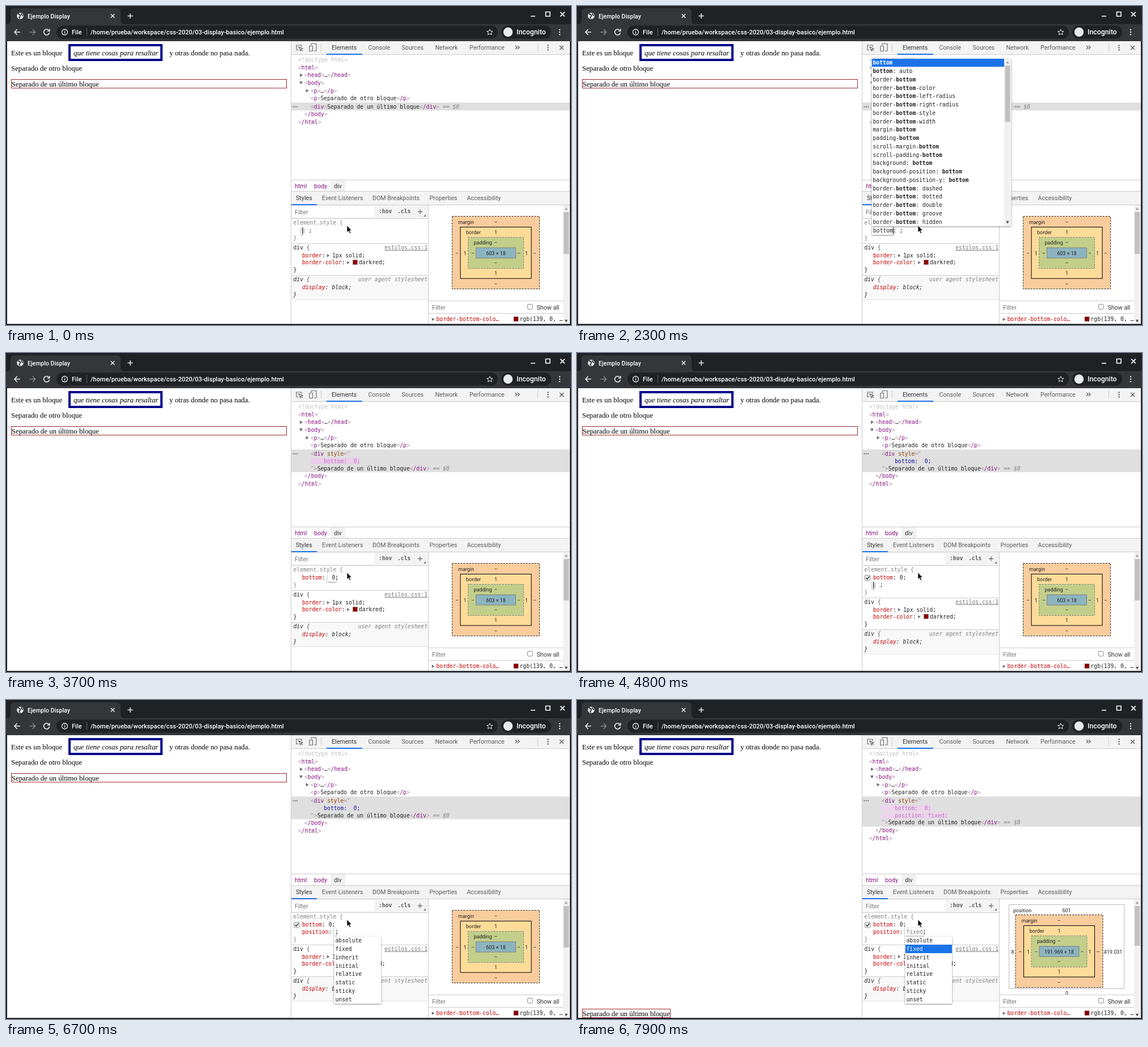
Write an HTML page that moves like this. It is 996x562 px and loops after 8000 ms.

```html
<!DOCTYPE html>
<html lang="es">
<head>
<meta charset="utf-8">
<title>Ejemplo Display</title>
<style>
html, body { margin: 0; width: 100%; height: 100%; overflow: hidden; background: #202124; }
svg { display: block; }
text { white-space: pre; }
.mono { font: 9.69px "DejaVu Sans Mono", monospace; fill: #222; }
.ui { font: 10.68px Roboto, sans-serif; fill: #5a5a5a; }
.bar { font: 500 11.05px Roboto, sans-serif; fill: #fff; }
.box { font: 9px Roboto, sans-serif; fill: #222; }
.page { font: 12.85px "Liberation Serif", serif; fill: #000; }
.it { font-style: italic; }
.b { font-weight: bold; }
.mid { text-anchor: middle; }
.end { text-anchor: end; }
.lift { filter: drop-shadow(0 1px 1.5px rgba(0, 0, 0, .45)); }
.crisp { shape-rendering: crispEdges; }
</style>
</head>
<body>
<svg id="stage" width="996" height="562" viewBox="0 0 996 562"><g id="fixed"></g><g id="live"></g></svg>
<script>
const LOOP = 8000, CW = 5.835, ROW = 14.75;
const RED = '#c80000', BLUE = '#1a73e8', GREY = '#808080', LINE = '#ccc';

// Drawing helpers; text is placed by the vertical centre of its capitals.
const SIZE = { mono: 9.69, ui: 10.68, bar: 11.05, box: 9, page: 12.85 };
const esc = s => s.replace(/&/g, '&amp;').replace(/</g, '&lt;');
const c = (color, s) => `<tspan fill="${color}">${esc(s)}</tspan>`;
const text = (x, cy, s, cls, style = '') =>
  `<text x="${x}" y="${(cy + SIZE[cls.split(' ')[0]] * .355).toFixed(2)}" class="${cls}" style="${style}">${s}</text>`;
const rect = (x, y, w, h, fill, more = '') =>
  `<rect x="${x}" y="${y}" width="${w}" height="${h}" fill="${fill}" ${more}/>`;
const path = (d, stroke, width = 1, fill = 'none') =>
  `<path d="${d}" stroke="${stroke}" stroke-width="${width}" fill="${fill}"/>`;
const circle = (x, y, r, fill, more = '') => `<circle cx="${x}" cy="${y}" r="${r}" fill="${fill}" ${more}/>`;
const TURN = { right: 0, down: 90, up: 270 };
const tri = (x, y, dir, r = 3, fill = '#6e6e6e') =>
  `<path d="M${-r * .8} ${-r}L${r * .9} 0L${-r * .8} ${r}z" fill="${fill}" transform="translate(${x} ${y}) rotate(${TURN[dir]})"/>`;
const cross = (x, y, r, color, w = 1.5) =>
  path(`M${x - r} ${y - r}l${2 * r} ${2 * r}m0 ${-2 * r}l${-2 * r} ${2 * r}`, color, w);
const plus = (x, y, r, color, w = 1.5) => path(`M${x - r} ${y}h${2 * r}M${x} ${y - r}v${2 * r}`, color, w);
const dots = (x, y, gap, color) => [-1, 0, 1].map(k => circle(x, y + k * gap, 1.2, color)).join('');

function chrome() {
  const ink = '#e8eaed';
  return rect(0, 0, 996, 562, '#202124')
    + '<path d="M2 32Q8 32 8 25V11Q8 4 15 4H195Q202 4 202 11V25Q202 32 208 32z" fill="#35363a"/>'
    + rect(0, 32, 996, 30, '#35363a')
    + circle(25, 17.5, 5.8, ink) + path('M21 14q3 0 4 2t-1 3 1 3M27 13q0 3 3 4', '#35363a', 1.8)
    + text(38, 18, 'Ejemplo Display', 'bar', 'font-size:10.5px')
    + cross(188, 17.5, 3.3, ink) + plus(219, 17.5, 4.6, ink)
    + path('M925 18h8M951.5 10.5h7.5v7.5h-7.5z', '#fff', 1.6) + cross(981, 14.5, 3.8, '#fff', 1.7)
    + path('M25 46H15M19.8 41L15 46L19.8 51', ink, 1.6)
    + path('M41.5 46H51.5M47 41L51.5 46L47 51', '#85878a', 1.6)
    + path('M75.5 42.8A5 5 0 1 0 76.5 47M76.8 40.5V44.3H73', ink, 1.6)
    + rect(89, 34.5, 778, 23, '#202124', 'rx="11.5"')
    + circle(103.5, 46, 5, 'none', `stroke="${ink}" stroke-width="1.3"`)
    + path('M103.5 43v1.3M103.5 45.3v3.5', ink, 1.4)
    + text(116, 46, 'File', 'bar') + rect(142, 39, 1, 14, '#5f6368')
    + text(149, 46, '/home/prueba/workspace/css-2020/03-display-basico/ejemplo.html', 'bar')
    + path('M852.8 41l1.5 3.4 3.7.3-2.8 2.4.9 3.7-3.3-2-3.3 2 .9-3.7-2.8-2.4 3.7-.3z', ink)
    + rect(873, 34.5, 88, 23, '#202124', 'rx="11.5"') + circle(885, 46, 8.2, ink)
    + text(900, 46, 'Incognito', 'bar', 'font-size:12.3px') + dots(976, 46, 4.2, ink)
    + rect(2, 62, 992, 498, '#fff');
}

function page() {
  return text(9, 82, 'Este es un bloque', 'page')
    + rect(112, 69, 162, 26, 'none', 'stroke="#00008b" stroke-width="4"')
    + text(119, 82, 'que tiene cosas para resaltar', 'page it')
    + text(288, 82, 'y otras donde no pasa nada.', 'page')
    + text(9, 109, 'Separado de otro bloque', 'page');
}

function devtools() {
  const tabs = (list, y) => list.map(([x, s], i) => text(x, y, s, 'ui', i ? '' : 'fill:#333')).join('');
  return rect(502, 62, 1, 498, LINE)
    + rect(503, 62, 491, 23, '#f3f3f3') + rect(503, 85, 491, 1, LINE) + rect(565, 84, 63, 2, BLUE)
    + path('M515.5 77.5h-3.5v-8.5h9v3M516 72l7 3-3 1-1 3zM520 76l3 3', '#6e6e6e', 1.2)
    + path('M538 69v-2.5h9V79h-4M535 70.5h5.5v9H535z', '#6e6e6e', 1.2) + rect(555, 66, 1, 15, LINE)
    + tabs([[574, 'Elements'], [638.5, 'Console'], [697.5, 'Sources'], [756.5, 'Network'], [817, 'Performance']], 73.5)
    + path('M898 70l3 3-3 3M902 70l3 3-3 3', '#5a5a5a', 1.3) + rect(937, 66, 1, 15, LINE)
    + dots(955.5, 73.5, 4, '#5a5a5a') + cross(979.5, 73.5, 3.5, '#5a5a5a', 1.4)
    + rect(503, 306, 491, 1, LINE) + rect(572, 307, 26, 20, '#f1f1f1')
    + ['html', 'body'].map((s, i) => text(509 + i * 34, 317, s, 'ui', 'fill:#881280')).join('')
    + text(578, 317, 'div', 'ui', 'fill:#333')
    + rect(503, 327, 491, 23, '#f3f3f3') + rect(503, 326, 491, 1, LINE) + rect(503, 350, 491, 1, LINE)
    + rect(503, 349, 45, 2, BLUE)
    + tabs([[511, 'Styles'], [557, 'Event Listeners'], [646, 'DOM Breakpoints'], [746.5, 'Properties'], [812.5, 'Accessibility']], 338.5)
    + rect(503, 351, 241, 23, '#f3f3f3') + rect(505, 353, 144, 19, '#fff') + rect(503, 374, 241, 1, LINE)
    + text(509, 363, 'Filter', 'ui', 'fill:#777')
    + text(657, 362, ':hov', 'mono b', 'fill:#5a5a5a') + text(690, 362, '.cls', 'mono b', 'fill:#5a5a5a')
    + plus(730, 362.5, 4, '#6e6e6e', 1.3) + path('M740 367v4h-4z', 'none', 0, '#6e6e6e')
    + rect(744, 351, 1, 209, LINE);
}

const tag = s => c('#a894a6', '<') + c('#881280', s) + c('#a894a6', '>');

const mix = (a, b, k) => a.map((v, i) => v + (b[i] - v) * k);
const rgb = v => `rgb(${v.map(Math.round)})`;
// cubic-bezier(0, 0, .2, 1)
function ease(x) {
  let lo = 0, hi = 1;
  for (let i = 0; i < 20; i++) {
    const s = (lo + hi) / 2;
    if (.6 * s * s + .4 * s ** 3 < x) lo = s; else hi = s;
  }
  return 3 * lo * lo - 2 * lo ** 3;
}
// A changed attribute flashes violet, rests on pink, then returns to the row colour.
function flash(age) {
  const p = Math.min(age / 1200, 1);
  const violet = [158, 54, 153], pink = [242, 218, 240], pale = [182, 112, 184];
  if (p < .8) {
    const k = ease(p / .8);
    return { back: rgb(mix(violet, pink, k)), ink: rgb(mix([255, 255, 255], pale, k)) };
  }
  const k = ease((p - .8) / .2);
  return { back: rgb(mix(pink, [223, 223, 223], k)), ink: rgb(mix(pale, [26, 26, 166], k)) };
}

const at = (list, t) => list.filter(e => e[0] <= t).pop()[1];

const NAME_1 = [[0, ''], ...[...'bottom'].map((_, i) => [1700 + i * 100, 'bottom'.slice(0, i + 1)])];
const NAME_2 = [[3900, ''], [5100, 'p'], [5300, 'po'], [5400, 'pos'], [5500, 'posit'], [5600, 'position']];
const VALUE_2 = [[6000, ''], [7000, 'absolute'], [7200, 'fixed']];
const CARET = [[0, 1], [600, 0], [1200, 1], [3600, 0], [3900, 1], [4200, 0], [4800, 1], [6700, 0], [7000, 1], [7900, 0]];
const FLASH = [[3100, 3100], [7000, 7000], [7200, 7200]];

function elements(t) {
  const props = t < 3100 ? [] : t < 7000 ? ['bottom:  0;'] : ['bottom:  0;', `position: ${at(VALUE_2, t)};`];
  const extra = props.length ? (props.length + 1) * 12.9 : 0;
  const last = 'Separado de un último bloque' + tag('/div') + `<tspan class="it" fill="${GREY}"> == $0</tspan>`;
  let out = text(515, 95, c('#c0c0c0', '<!doctype html>'), 'mono')
    + text(515, 108.3, tag('html'), 'mono')
    + tri(520.5, 122, 'right') + text(526, 122, tag('head') + '…' + tag('/head'), 'mono')
    + tri(520, 135.5, 'down') + text(526, 135.5, tag('body'), 'mono')
    + tri(531, 149.3, 'right') + text(537, 149.3, tag('p') + '…' + tag('/p'), 'mono')
    + text(537, 163, tag('p') + 'Separado de otro bloque' + tag('/p'), 'mono')
    + rect(503, 170, 491, 14 + extra, '#dfdfdf', 'class="crisp"')
    + [0, 1, 2].map(i => circle(506.5 + i * 3.3, 177.5, 1, '#5a5a5a')).join('');
  if (!props.length) out += text(537, 177.3, tag('div') + last, 'mono');
  else {
    const { back, ink } = flash(t - at(FLASH, t));
    out += text(537, 177.3, c('#a894a6', '<') + c('#881280', 'div') + c('#994500', ' style') + c('#a894a6', '="'), 'mono');
    props.forEach((s, i) => {
      const y = 190.2 + i * 12.9;
      out += rect(537, y - 5.6, (s.length + 4) * CW, 11.2, back) + text(537, y, c(ink, '    ' + s), 'mono');
    });
    out += text(537, 177.3 + extra, c('#a894a6', '">') + last, 'mono');
  }
  return out + text(526, 191 + extra, tag('/body'), 'mono') + text(515, 204.6 + extra, tag('/html'), 'mono');
}

function edit(x, cy, typed, ghost, caret) {
  return rect(x - 2, cy - 7, (typed + ghost).length * CW + 4, 14, '#fff', 'class="lift"')
    + text(x, cy, typed + c(GREY, ghost), 'mono')
    + (caret ? rect(x + typed.length * CW, cy - 6, 1, 12, '#000', 'class="crisp"') : '');
}

const complete = s => s === 'p' ? 'padding' : s[0] === 'p' ? 'position' : s.length > 2 ? 'bottom' : s ? 'border' : '';

function nameEdit(cy, typed, caret) {
  const full = complete(typed);
  return edit(522, cy, typed, full.slice(typed.length), caret)
    + text(522 + full.length * CW, cy, ': ;', 'mono');
}

function styles(t) {
  const caret = at(CARET, t), dy = t < 3900 ? 0 : 12.6;
  const name = (y, s) => text(522, y, c(RED, s) + ':', 'mono');
  let out = text(506.5, 382, c(GREY, 'element.style {'), 'mono');
  if (t < 3000) out += nameEdit(396, at(NAME_1, t), caret);
  else {
    const x = 522 + 8 * CW;
    out += name(396, 'bottom');
    if (t < 3900) {
      const value = t < 3100 ? '' : ' 0';
      out += edit(x, 396, value, '', caret) + text(x + value.length * CW, 396, ';', 'mono');
    } else out += text(x, 396, '0;', 'mono');
  }
  if (t >= 3900 && (t < 5100 || t >= 6000))
    out += rect(507.5, 391.5, 9.5, 9.5, '#fff', 'rx="1.5" stroke="#888"') + path('M509.5 396l2 2.5 4-5', '#333', 1.6);
  if (t >= 3900 && t < 6000) out += nameEdit(408.5, at(NAME_2, t), caret);
  if (t >= 6000) {
    const value = at(VALUE_2, t), x = 522 + 10 * CW;
    out += name(408.5, 'position')
      + edit(x, 408.5, '', value, caret) + text(x + value.length * CW, 408.5, ';', 'mono');
  }
  return out + `<g transform="translate(0 ${dy})">`
    + text(506.5, 408.5, c(GREY, '}'), 'mono') + rect(503, 418, 241, 1, LINE, 'class="crisp"')
    + text(506.5, 425.7, 'div ' + c('#555', '{'), 'mono')
    + text(743, 425.7, 'estilos.css:1', 'mono end', 'fill:#777;text-decoration:underline')
    + name(439.7, 'border') + tri(568, 439.7, 'right', 2.7) + text(575, 439.7, '1px solid;', 'mono')
    + name(452, 'border-color') + tri(603.5, 452, 'right', 2.7)
    + rect(611.5, 447.5, 8, 8, '#8b0000', 'stroke="#777" stroke-width=".5"')
    + text(622, 452, 'darkred;', 'mono') + text(506.5, 464.5, '}', 'mono')
    + rect(503, 474, 241, 43.5, '#f8f8f8') + rect(503, 474, 241, 1, LINE, 'class="crisp"')
    + rect(503, 517, 241, 1, '#e4e4e4', 'class="crisp"')
    + text(506.5, 482, 'div ' + c('#555', '{'), 'mono it')
    + text(743, 482, 'user agent stylesheet', 'mono it end', `fill:${GREY}`)
    + text(522, 496, c(RED, 'display') + ': block;', 'mono it') + text(506.5, 508.5, '}', 'mono it') + '</g>';
}

function boxModel(placed) {
  const label = (x, y, s, cls = 'mid') => text(x, y, s, 'box ' + cls);
  const dash = 'stroke-dasharray="3 2"';
  const layer = (x, y, w, h, fill, stroke, more = '') => rect(x, y, w, h, fill, `stroke="${stroke}" ${more}`);
  let out = '';
  if (placed)
    out += layer(761.5, 360.5, 203, 160, '#fff', '#bbb') + rect(761, 509, 205, 12, '#fff') + rect(761, 508, 204, 1, '#bbb')
      + label(769, 370.5, 'position', '') + label(863, 370.5, '601') + label(768, 443.5, '8')
      + label(945, 443.5, '419.031') + label(863.5, 517, '0');
  out += `<g transform="translate(${placed ? '-13.5 8' : '0 0'})">`
    + layer(786.5, 370.5, 154, 128, '#f9cc9d', '#222', dash) + layer(801, 389.5, 125, 90.5, '#fddc9a', '#000')
    + layer(814.5, 407.5, 98, 55, '#c2ce8a', GREY, dash) + layer(828.5, 426, 70, 18, '#8cb4c0', GREY)
    + label(797, 380.5, 'margin', '') + label(811, 398.5, 'border', '') + label(824.5, 417, 'padding', '')
    + label(863.5, 435.5, placed ? '191.969 × 18' : '603 × 18');
  [['–', 380.5, 490, 795, 932], ['1', 398.5, 471, 809, 917.5], ['–', 417, 453, 823, 904]].forEach(([s, top, bottom, left, right]) => {
    out += label(863.5, top, s) + label(863.5, bottom, s) + label(left, 435.5, s) + label(right, 435.5, s);
  });
  return out + '</g>';
}

function computed(t) {
  const placed = t >= 7000;
  return boxModel(placed)
    + rect(745, 520, 237, 40, '#fff') + rect(745, 519, 237, 1, LINE) + text(751, 531.5, 'Filter', 'ui', 'fill:#777')
    + rect(919.5, 525.5, 8.5, 8.5, '#fff', 'rx="1.5" stroke="#888"') + text(935.5, 531.5, 'Show all', 'ui', 'fill:#333')
    + rect(745, 541, 237, 1, LINE) + tri(753, 552, 'right', 2.8)
    + text(758.5, 552, c(RED, 'border-bottom-colo…'), 'mono')
    + rect(895, 547.5, 8, 8, '#8b0000', 'stroke="#777" stroke-width=".5"') + text(905.5, 552, 'rgb(139, 0, …', 'mono')
    + rect(982, 351, 12, 209, '#f1f1f1') + rect(983, 363, 9.5, placed ? 70 : t < 3100 ? 74 : 73, '#c1c1c1')
    + tri(987.5, 357, 'up', 2.7, '#a3a3a3') + tri(987.5, 555, 'down', 2.7, '#505050');
}

const names = s => s.split(',').map(v => v.trim());
const family = (base, tails) => names(tails).map(v => base + v);
const blockParts = ',-color,-style,-width';
const B_BORDER = [...family('border-block-end', blockParts), ...family('border-block-start', blockParts),
  ...family('border-bottom', ',-color')];
const B_LIST = [...family('background-', 'image,origin,position,position-x,position-y,repeat,repeat-x,repeat-y,size'),
  'block-size', 'border', ...B_BORDER];
const BO_LIST = ['border', ...B_BORDER, ...family('border-bottom-', 'left-radius,right-radius,style,width'),
  ...family('border-', 'collapse,color,image,image-outset,image-repeat')];
const BOTTOM_LIST = ['bottom', 'bottom: auto', ...family('border-bottom', ',-color,-left-radius,-right-radius,-style,-width'),
  ...names('margin-bottom,padding-bottom,scroll-margin-bottom,scroll-padding-bottom,background: bottom,background-position: bottom,background-position-y: bottom'),
  ...family('border-bottom: ', 'dashed,dotted,double,groove,hidden')];
const P_LIST = [...family('padding', ',-block-end,-block-start,-bottom,-inline-end,-inline-start,-left,-right,-top'),
  ...names('page,page-break-after,page-break-before,page-break-inside,paint-order,perspective,perspective-origin,place-content,place-items,place-self,pointer-events')];
const POSITION_LIST = ['position', ...family('position: ', 'absolute,fixed,relative,static,sticky'),
  ...family('background-position', ',-x,-y'), ...names('list-style-position,object-position,text-underline-position'),
  ...family('-webkit-mask-position', ',-x,-y'), '-webkit-ruby-position', '-webkit-text-emphasis-position',
  ...family('background-position: ', 'bottom,center,left')];
const VALUES = names('absolute,fixed,inherit,initial,relative,static,sticky,unset');

function popup(x, y, w, h, rows, { query = '', picked = 0, hover = -1, top = 0, thumb }) {
  const inner = thumb ? w - 12.5 : w;
  const list = rows.map((s, i) => {
    const ry = i * ROW - top, on = i === picked;
    const fill = on ? BLUE : i === hover ? '#e8eefb' : '';
    const label = query ? s.replace(query, `<tspan class="b">${query}</tspan>`) : s;
    return (fill ? rect(0, ry, inner, ROW, fill, 'class="crisp"') : '')
      + text(2, ry + ROW / 2, label, 'mono', on ? 'fill:#fff' : '');
  }).join('');
  const scroll = thumb ? rect(inner, 0, 12.5, h, '#f1f1f1') + rect(inner + 1.5, thumb[0], 9, thumb[1], '#c1c1c1')
    + tri(inner + 6, 6.5, 'up', 2.7, top ? '#505050' : '#a3a3a3') + tri(inner + 6, h - 7, 'down', 2.7, '#505050') : '';
  return rect(x, y, w, h, '#fff', 'class="lift"') + `<svg x="${x}" y="${y}" width="${w}" height="${h}">${list}${scroll}</svg>`;
}

function suggestions(t) {
  if (t >= 1700 && t < 3000) {
    const query = at(NAME_1, t);
    if (query === 'b')
      return popup(519.5, 92.7, 268.5, 295.3, B_LIST, { query, picked: 10, hover: 20, top: 7, thumb: [13.5, 24] });
    if (query === 'bo') return popup(519.5, 92.7, 274, 295.3, BO_LIST, { query, thumb: [12.5, 60] });
    return popup(519.5, 92.7, 246, 295.3, BOTTOM_LIST, { query, thumb: [12.5, 99] });
  }
  if (t >= 5100 && t < 6000) {
    const query = at(NAME_2, t);
    return query === 'p' ? popup(519.5, 105.2, 274, 295.3, P_LIST, { query, hover: 19, thumb: [12.5, 40] })
      : popup(519.5, 105.2, 252.5, 295.3, POSITION_LIST, { query, hover: 19, thumb: [12.5, 100] });
  }
  if (t >= 6100) return popup(578.5, 416.7, 82.5, 118.3, VALUES, { picked: VALUES.indexOf(at(VALUE_2, t)) });
  return '';
}

function lastBlock(t) {
  const placed = t >= 7000, y = placed ? 544.4 : 129.4;
  return rect(9.4, y, placed ? 155 : 485.2, 15.3, 'none', 'stroke="#8b0000" stroke-width=".85"')
    + text(9.8, y + 7.6, 'Separado de un último bloque', 'page');
}

const pointer = path('M601 386.5V399l2.8-2.6 2 4.4 2-.9-2-4.3h3.7z', '#fff', .8, '#000');

document.getElementById('fixed').innerHTML = chrome() + page() + devtools();
const live = document.getElementById('live');
let shown = -1;
function frame() {
  const t = Math.floor(performance.now() % LOOP / 100) * 100;
  if (t !== shown) {
    shown = t;
    live.innerHTML = lastBlock(t) + elements(t) + styles(t) + computed(t) + suggestions(t) + pointer
      + rect(0, 560, 996, 2, '#202124');
  }
  requestAnimationFrame(frame);
}
frame();
</script>
</body>
</html>
```
